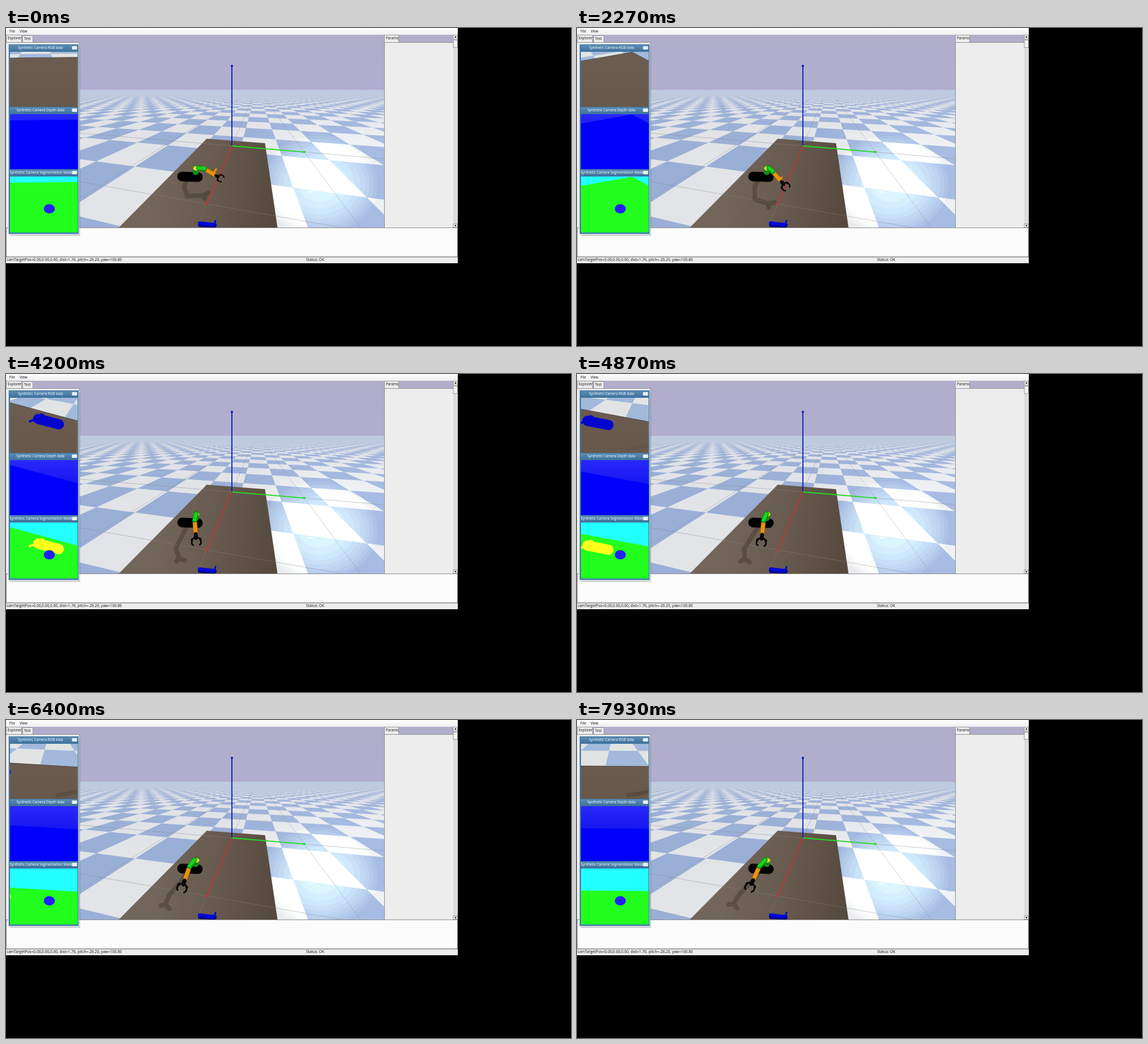
Write an HTML page with a canvas that moves like this. It is 998 px wide and 561 px high and loops after 8000 ms.

```html
<!DOCTYPE html>
<html lang="en">
<head>
<meta charset="utf-8">
<title>Robot arm simulation</title>
<style>
html, body { margin: 0; width: 100%; height: 100%; overflow: hidden; background: #000; }
canvas, svg { position: absolute; left: 0; top: 0; width: 998px; height: 561px; }
text { font: 6.25px "Open Sans", sans-serif; fill: #111; }
.title { fill: #fff; text-anchor: middle; }
.status { font-size: 6.67px; }
</style>
</head>
<body>
<canvas id="stage" width="998" height="561"></canvas>
<svg viewBox="0 0 998 561">
  <text x="6" y="8">File</text><text x="24" y="8">View</text>
  <text x="3" y="20">Explorer</text><text x="32" y="21">Test</text>
  <text x="671" y="20">Params</text>
  <text class="title" x="61" y="37">Synthetic Camera RGB data</text>
  <text class="title" x="61" y="147">Synthetic Camera Depth data</text>
  <text class="title" x="61.5" y="257">Synthetic Camera Segmentation Mask</text>
  <text class="status" x="1" y="411">camTargetPos=0.00,0.00,0.00, dist=1.76, pitch=-26.20, yaw=100.80</text>
  <text class="status" x="530" y="411">Status: OK</text>
  <g fill="#e9eef2"><rect x="116.5" y="32" width="9" height="6" rx="1"/><rect x="116.5" y="142" width="9" height="6" rx="1"/><rect x="116.5" y="252" width="9" height="6" rx="1"/></g>
</svg>
<script>
const LOOP = 8000, FPS = 15, RAD = Math.PI / 180;
const VIEW = { x: 130, y: 12, w: 538, h: 340 };
const FLOOR_Z = -0.65, TABLE_Z = -0.025;
const TABLE = { far: -0.25, near: 1.25, side: 0.5 };
const ARM_BASE = [0.71, -0.23];
const ctx = document.getElementById('stage').getContext('2d');
const clamp = v => Math.max(0, Math.min(1, v));

// Pinhole camera: projects world points, and casts rays for pixels onto the floor
function makeCamera(eye, heading, pitch, fx, fy, midX, midY) {
  const ch = Math.cos(heading), sh = Math.sin(heading), cp = Math.cos(pitch), sp = Math.sin(pitch);
  return {
    project(x, y, z = 0) {
      const dx = x - eye[0], dy = y - eye[1], dz = z - eye[2];
      const ahead = dx * ch + dy * sh, side = dx * sh - dy * ch;
      const depth = Math.max(0.05, ahead * cp - dz * sp);
      return [midX + fx * side / depth, midY - fy * (ahead * sp + dz * cp) / depth];
    },
    hitFloor(px, py) {
      const u = (px - midX) / fx, v = (midY - py) / fy;
      const t = (eye[2] - FLOOR_Z) / (sp - v * cp), ahead = t * (cp + v * sp), side = t * u;
      return { t, x: eye[0] + ahead * ch + side * sh, y: eye[1] + ahead * sh - side * ch };
    }
  };
}

function orbitCamera(dist, pitch, yaw) {
  const flat = dist * Math.cos(pitch);
  const eye = [flat * Math.sin(yaw), -flat * Math.cos(yaw), dist * Math.sin(pitch)];
  return makeCamera(eye, yaw + Math.PI / 2, pitch, 207.5, 207.5, 399, 208);
}

const main = orbitCamera(1.76, 26.2 * RAD, 100.8 * RAD);

// The arm turns from the side of the table to its front, settling slowly
const armHeading = t => 90 * Math.exp(-((t / 4.1) ** 2)) - 1.5;

function wristCamera(deg) {
  const a = deg * RAD, reach = 0.24;
  const eye = [ARM_BASE[0] + reach * Math.cos(a), ARM_BASE[1] + reach * Math.sin(a), 0.23];
  const pitch = (46 + 6 * Math.sqrt(clamp(deg / 90))) * RAD;
  return makeCamera(eye, a, pitch, 104, 84, 67, 90.5);
}

function floorColor(px, py) {
  const { t, x, y } = main.hitFloor(px, py);
  if (t <= 0 || t > 105) return [177, 174, 203 + 4 * clamp(py / 110)];
  const blur = clamp(t * t / 300 * 0.5);
  const blue = (Math.floor(x) + Math.floor(y)) & 1;
  const mix = blue * (1 - blur) + 0.5 * blur;
  const ring = Math.ceil(8 * clamp(1 - Math.hypot((px - 553) / 103, (py - 276) / 86) ** 2)) / 8;
  const glow = 13 * clamp((px - 400) / 150) * clamp((py - 120) / 80);
  return [226 - 72 * mix + glow + 52 * ring,
          228 - 53 * mix + glow + 58 * ring,
          231 - 17 * mix + glow + 34 * ring];
}

function polygon(c, points, fill) {
  c.beginPath();
  points.forEach(p => c.lineTo(...p));
  c.closePath();
  c.fillStyle = fill;
  c.fill();
}

function stroke(c, points, color, width, cap = 'round') {
  c.beginPath();
  points.forEach(p => c.lineTo(...p));
  c.strokeStyle = color;
  c.lineWidth = width;
  c.lineCap = cap;
  c.lineJoin = 'round';
  c.stroke();
}

function rect(c, color, x, y, w, h) {
  c.fillStyle = color;
  c.fillRect(x, y, w, h);
}

function frame(c, fill, line, x, y, w, h) {
  rect(c, fill, x, y, w, h);
  c.strokeStyle = line;
  c.lineWidth = 0.9;
  c.strokeRect(x, y, w, h);
}

function ellipse(c, color, x, y, rx, ry) {
  c.beginPath();
  c.ellipse(x, y, rx, ry, 0, 0, 7);
  c.fillStyle = color;
  c.fill();
}

function gradient(c, x0, y0, x1, y1, ...colors) {
  const g = c.createLinearGradient(x0, y0, x1, y1);
  colors.forEach((color, i) => g.addColorStop(i / (colors.length - 1), color));
  return g;
}

function paintFloor(c) {
  const image = c.createImageData(VIEW.w, VIEW.h), sub = 3;
  for (let y = 0, o = 0; y < VIEW.h; y++) for (let x = 0; x < VIEW.w; x++, o += 4) {
    const sum = [0, 0, 0];
    for (let n = 0; n < sub * sub; n++) {
      floorColor(VIEW.x + x + (n % sub + 0.5) / sub, VIEW.y + y + (Math.floor(n / sub) + 0.5) / sub)
        .forEach((v, k) => sum[k] += Math.min(255, v));
    }
    sum.forEach((v, k) => image.data[o + k] = v / (sub * sub));
    image.data[o + 3] = 255;
  }
  c.putImageData(image, VIEW.x, VIEW.y);
}

function paintWorld(c) {
  paintFloor(c);
  c.save();
  c.beginPath();
  c.rect(VIEW.x, VIEW.y, VIEW.w, VIEW.h);
  c.clip();
  ellipse(c, 'rgba(255,255,255,.8)', 538, 289, 6, 1.5);

  const { far, near, side } = TABLE;
  const corners = [[far, -side], [far, side], [near, side], [near, -side]];
  polygon(c, corners.map(([x, y]) => main.project(x, y, TABLE_Z)),
          gradient(c, 260, 300, 470, 330, '#72665a', '#675a4e', '#56493e'));

  const gray = 'rgba(135,135,140,.65)';
  for (const x of [0, 1]) stroke(c, [main.project(x, -6), main.project(x, 4)], gray, 0.7);
  for (const y of [-1, 0, 1]) stroke(c, [main.project(-8, y), main.project(1.4, y)], gray, 0.6);

  const axis = (end, color, width) => {
    const [x, y] = main.project(...end);
    stroke(c, [main.project(0, 0), [x, y]], color, width);
    rect(c, color, x - 1.7, y - 1.7, 3.4, 3.4);
  };
  axis([0, 0, 1], '#0612c4', 1.8);
  axis([0, 1, 0], '#22dc22', 1.8);
  axis([1, 0, 0], '#d92c2c', 1.4);

  stroke(c, [[343, 347], [368, 348]], '#00058c', 8);
  stroke(c, [[342, 344], [366, 347]], '#0008d8', 6);
  stroke(c, [[368, 346], [370, 340]], '#0008d8', 3);
  c.restore();
}

function paintChrome(c) {
  const panel = '#ededed', line = '#8f8f8f', sky = '#b1aecb';
  rect(c, gradient(c, 0, 0, 0, 12, '#fff', '#eee'), 0, 0, 798, 12);
  for (const x of [0, 668]) {
    rect(c, sky, x, 12, 130, 13);
    rect(c, panel, x, 25, 130, 327);
    stroke(c, [[x, 25.5], [x + 130, 25.5]], line, 1, 'butt');
  }
  frame(c, panel, line, 0.5, 12.5, 27, 13);
  frame(c, panel, line, 29.5, 13.5, 18, 12);
  frame(c, panel, line, 668.5, 12.5, 25, 13);
  for (const x of [129.5, 668.5]) stroke(c, [[x, 25], [x, 352]], line, 1);
  rect(c, '#dcdcdc', 790, 12, 8, 340);
  frame(c, '#f2f2f2', line, 790.5, 12.5, 7, 7);
  frame(c, '#f2f2f2', line, 790.5, 21.5, 7, 13);
  frame(c, '#f2f2f2', line, 790.5, 345.5, 7, 6);
  for (const [y, d] of [[16, 1], [348.5, -1]]) polygon(c, [[792, y + d], [796, y + d], [794, y - 2 * d]], '#222');

  frame(c, '#fcfcfd', line, 0.5, 352.5, 797, 51);
  rect(c, panel, 0, 404, 798, 11);
  stroke(c, [[0, 404.5], [798, 404.5]], '#aaa', 0.8);

  rect(c, 'rgba(0,0,0,.16)', 7, 32, 124, 335);
  rect(c, '#c0d6e4', 4, 28.5, 125.5, 336);
  for (const y of [29, 139, 249]) {
    rect(c, '#42749d', 5, y, 123, 114);
    rect(c, gradient(c, 0, y, 0, y + 12, '#5b8fb8', '#3f729d'), 6, y + 1, 121, 11);
  }
}

function drawArm(deg) {
  const a = (deg * 1.06 - 5) * RAD, turn = clamp(deg / 90);
  const joint = (reach, z) => main.project(ARM_BASE[0] + reach * Math.cos(a), ARM_BASE[1] + reach * Math.sin(a), z);
  const [ex, ey] = joint(0.12, 0.08), [wx, wy] = joint(0.21, 0.03);
  const len = Math.hypot(wx - ex, wy - ey), dx = (wx - ex) / len, dy = (wy - ey) / len;
  const size = 1 - 0.3 * turn ** 2;
  const hand = (along, across) => [wx + (dx * along + dy * across) * size, wy + (dy * along - dx * across) * size];

  const fall = (p, x, y) => [p[0] + x, p[1] + y];
  const tip = fall(hand(12, 0), -30, 31), bend = fall([ex, ey], -34, 46);
  const claw = [-1, 1].map(side => fall(hand(19, side * 8), -28, 29));
  stroke(ctx, [[322, 266], [314, 279], bend, tip, claw[0], tip, claw[1]], 'rgba(45,34,26,.32)', 8);

  stroke(ctx, [[311, 262], [339, 263]], '#000', 17);

  const green = '#18d31d', darkGreen = '#118a14', orange = '#e99313';
  const top = [336, 247];
  stroke(ctx, [[335, 254], top], darkGreen, 11);
  ellipse(ctx, '#ded824', 336, 247.5, 5.5, 4);
  const from = [top[0] + (ex - top[0]) * .25, top[1]];
  stroke(ctx, [from, [ex - dx * 3, ey - dy * 3]], darkGreen, 9);
  stroke(ctx, [from, [ex - dx * 4, ey - dy * 4 - 1]], green, 6);

  stroke(ctx, [[ex, ey], [wx, wy]], '#8f570c', 8.5, 'butt');
  stroke(ctx, [[ex, ey], [wx, wy]], orange, 6.5, 'butt');
  const nub = 10 * turn ** 2, bx = wx - dx * 5, by = wy - dy * 5;
  stroke(ctx, [[bx, by], [bx + dy * nub, by - dx * nub]], orange, 3.5);

  stroke(ctx, [hand(0, 0), hand(7, 0)], '#080808', 7 * size);
  for (const side of [-1, 1]) {
    stroke(ctx, [hand(5, 0), hand(9, side * 8), hand(17, side * 8.5), hand(20, side * 6)], '#060606', 2.8 * size);
    ellipse(ctx, '#000', ...hand(10, side * 7.5), 2.2 * size, 2.2 * size);
  }
}

function inPanel(index, draw) {
  ctx.save();
  ctx.translate(0, 110 * index);
  ctx.beginPath();
  ctx.rect(7, 42, 119.5, index === 2 ? 98.5 : 97);
  ctx.clip();
  draw();
  ctx.restore();
}

function drawBottle(color, deg) {
  const shift = 4 * (deg - 31);
  ctx.save();
  ctx.translate(80 + shift, 84 - shift * 0.06);
  ctx.rotate(0.26 + shift * 0.0015);
  stroke(ctx, [[-20, 0], [18, 0]], color, 18);
  stroke(ctx, [[-33, 8], [-26, 3]], color, 4);
  stroke(ctx, [[-17, -9], [-13, -9]], color, 4);
  ctx.restore();
}

function drawTiles(cam) {
  for (let x = -5; x < 8; x++) for (let y = -5; y < 8; y++) {
    if (!((x + y) & 1)) continue;
    polygon(ctx, [[x, y], [x + 1, y], [x + 1, y + 1], [x, y + 1]].map(p => cam.project(...p, FLOOR_Z)), '#a2b9dc');
  }
}

function drawPanels(deg) {
  const cam = wristCamera(deg), { near, side } = TABLE;
  const edge = [[0.2, side], [near, side], [near, -side]].map(p => cam.project(...p, TABLE_Z));
  const table = [...edge, [900, 900], [-900, 900]];
  const fill = color => rect(ctx, color, 7, 42, 120, 99);

  inPanel(0, () => {
    fill('#e1e4e3');
    drawTiles(cam);
    polygon(ctx, table, gradient(ctx, 0, 42, 0, 139, '#6d5d50', '#67584b'));
    stroke(ctx, edge, '#453b33', 0.8);
    ctx.globalAlpha = clamp(1 - deg / 25);
    stroke(ctx, [[90, 133], [108, 130], [128, 126]], 'rgba(45,34,26,.25)', 7);
    ctx.globalAlpha = 1;
    drawBottle('#0505ce', deg);
  });
  inPanel(1, () => {
    fill(gradient(ctx, 0, 42, 0, 85, '#2828fb', '#1515ef'));
    polygon(ctx, table, '#0000fc');
  });
  inPanel(2, () => {
    fill('#22ffff');
    polygon(ctx, table, '#22ff1e');
    drawBottle('#ffff1c', deg);
    ellipse(ctx, '#2420f8', 76.5, 99, 9.8, 8.3);
  });
}

const backdrop = document.createElement('canvas');
backdrop.width = 998;
backdrop.height = 561;
const back = backdrop.getContext('2d');
rect(back, '#000', 0, 0, 998, 561);
paintWorld(back);
paintChrome(back);

function render(now) {
  const deg = armHeading(Math.floor((now % LOOP) * FPS / 1000 + 0.05) / FPS);
  ctx.drawImage(backdrop, 0, 0);
  drawArm(deg);
  drawPanels(deg);
}

const start = performance.now();
function tick() {
  render(performance.now() - start);
  requestAnimationFrame(tick);
}
tick();
</script>
</body>
</html>
```
